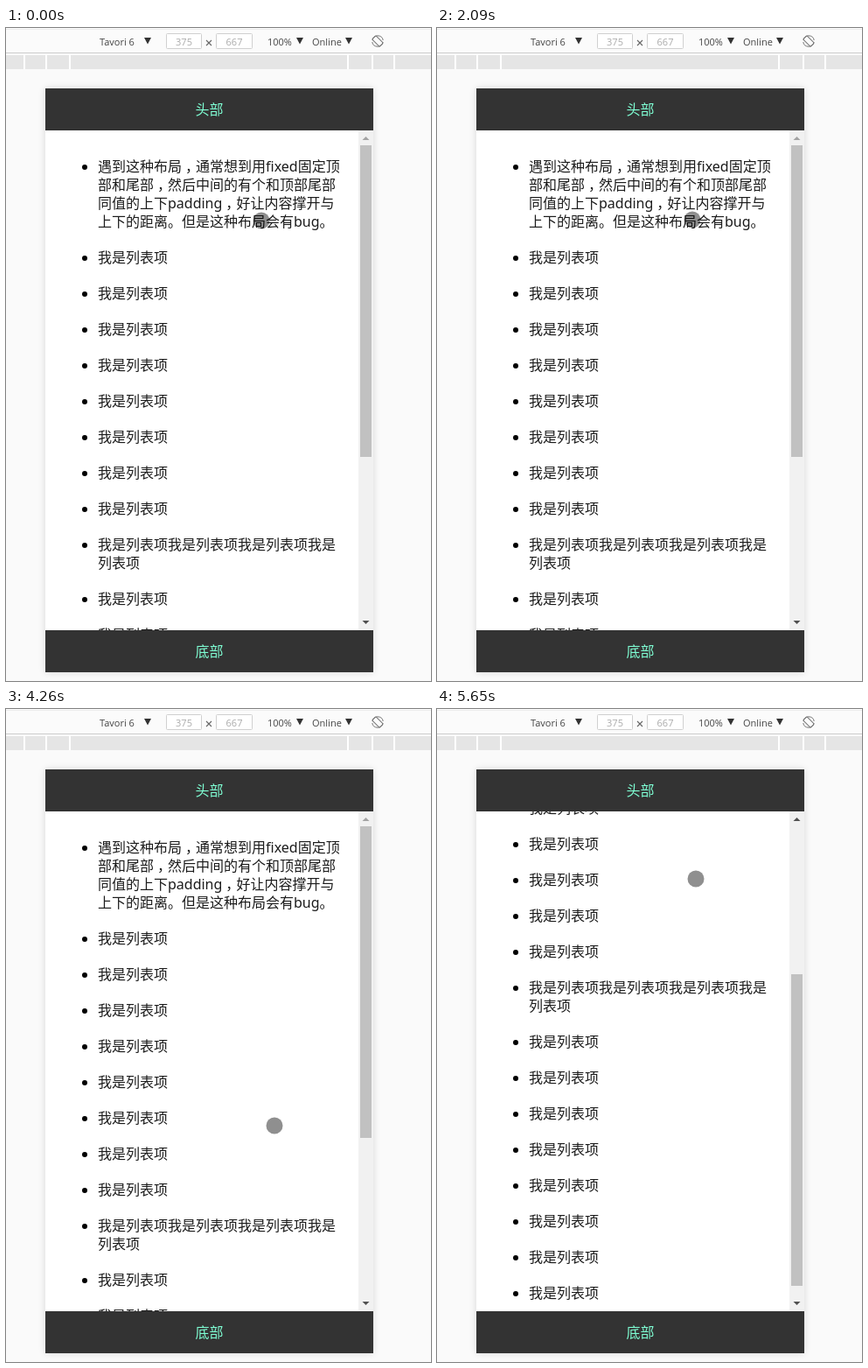
Recreate the animation shown at these times as an HTML page. Size 486 by 746 pixels, loop 5.96 s.

```html
<!DOCTYPE html>
<html lang="zh-CN">
<head>
<meta charset="utf-8">
<title>Fixed header and footer</title>
<style>
  html, body { margin: 0; width: 100%; height: 100%; overflow: hidden; background: #fafafa; }
  #stage { position: relative; width: 486px; height: 746px; overflow: hidden; background: #fafafa; }
  #stage > * { position: absolute; }
  #bar { left: 0; top: 0; font: 11px "Open Sans", sans-serif; }
  #phone {
    left: 45px; top: 69px; width: 375px; height: 667px; overflow: hidden; background: #fff;
    font: 16px/21px "Noto Sans", "Noto Sans CJK SC", "Noto Sans CJK", sans-serif; color: #1c1c1c;
  }
  #edge { left: 45px; top: 69px; width: 375px; height: 667px; box-shadow: 0 0 8px rgba(0, 0, 0, .14); }
  #phone > * { position: absolute; }
  header, footer {
    left: 0; width: 375px; height: 48px; line-height: 48px;
    background: #333; color: aquamarine; text-align: center;
  }
  header { top: 0; }
  footer { bottom: 0; }
  main { left: 0; top: 48px; width: 375px; height: 571px; overflow: hidden; }
  ul { position: absolute; left: 60px; top: 31px; margin: 0; padding: 0; list-style: none; white-space: nowrap; }
  li { position: relative; margin-bottom: 20px; }
  li::before {
    content: ""; position: absolute; left: -18px; top: 8px;
    width: 6px; height: 6px; border-radius: 50%; background: #000;
  }
  li div { height: 21px; }
  li i { position: relative; left: 4px; font-style: normal; }
  #track { position: absolute; right: 0; top: 0; }
  #touch {
    left: -9.5px; top: -9.5px; width: 19.5px; height: 19.5px;
    border-radius: 50%; background: rgba(0, 0, 0, .44);
  }
</style>
</head>
<body>
<div id="stage">
  <svg id="bar" width="486" height="48" fill="#444">
    <rect width="486" height="28" fill="#fbfbfb"/>
    <path d="M0 1.5H486" stroke="#ececec"/>
    <path d="M0 28.5H486" stroke="#ccc"/>
    <rect y="31" width="486" height="16" fill="#e5e5e5"/>
    <path d="M21 31v16M46 31v16M73 31v16M391 31v16M419 31v16M444 31v16" stroke="#fff" stroke-width="2"/>
    <text x="107" y="20">Tavori 6</text>
    <text x="299" y="20">100%</text>
    <text x="350" y="20">Online</text>
    <path d="M158 11h8l-4 7.5zM332 11h8l-4 7.5zM388 11h8l-4 7.5z" fill="#333"/>
    <g fill="#fff" stroke="#d0d0d0">
      <rect x="183.5" y="6.5" width="40" height="17" rx="1"/>
      <rect x="240.5" y="6.5" width="41" height="17" rx="1"/>
    </g>
    <g fill="#aaa" text-anchor="middle">
      <text x="203.5" y="20">375</text>
      <text x="261" y="20">667</text>
    </g>
    <path d="M229 14l6 6m0-6l-6 6" stroke="#666" stroke-width="1.1"/>
    <g transform="translate(425 15)" fill="none" stroke="#777">
      <rect x="-6" y="-3" width="12" height="6" rx="1" transform="rotate(45)"/>
      <path d="M-6 -1A6 6 0 0 1 0 -6.2Q5.5 -6 6.2 -1M6 1A6 6 0 0 1 0 6.2Q-5.5 6 -6.2 1"/>
    </g>
  </svg>

  <div id="edge"></div>
  <div id="phone">
    <main>
      <ul id="list"></ul>
      <svg id="track" width="17" height="571">
        <rect width="17" height="571" fill="#f1f1f1"/>
        <rect id="thumb" x="2" y="17" width="13" height="356" fill="#c1c1c1"/>
        <path id="up" d="M4.5 11h8l-4 -4z"/>
        <path id="down" d="M4.5 560h8l-4 4z"/>
      </svg>
    </main>
    <header>头部</header>
    <footer>底部</footer>
  </div>
  <div id="touch"></div>
</div>

<script>
const $ = id => document.getElementById(id);
const LOOP = 5960, MAX = 291;

const intro = ['遇到这种布局，通常想到用fixed固定顶', '部和尾部，然后中间的有个和顶部尾部',
  '同值的上下padding，好让内容撑开与', '上下的距离。但是这种布局会有bug。'];
const item = '我是列表项';
const short = Array(8).fill([item]);
const items = [intro, ...short, [item.repeat(3) + '我是', '列表项'], ...short];
const line = s => `<div>${s.replace('，', '<i>，</i>')}</div>`;
$('list').innerHTML = items.map(lines => `<li>${lines.map(line).join('')}</li>`).join('');

// Wheel scrolling with a resting pointer: scroll offset per step
const wheelDown = [20, 80, 147, 238, 275, 288, MAX];
const wheelUp = [285, 190, 80, 15, 0];
const wheel = (x, offsets) => offsets.map(s => ({ x, y: 218.5, s }));

// Touch drag: the page follows the finger after a short slop
const drag = ys => ys.map(y => ({
  x: y > 296.5 ? 302.5 + (y - 296.5) * 4 / 179 : 295.5 + (y - 193.5) * 7 / 103,
  y,
  s: Math.max(0, Math.round((475.5 - y) * .99 - 7))
}));
const approach = [230, 290, 370, 440, 468].map(y => ({
  x: 290.5 + 16 * (y - 218.5) / 257, y, s: 0
}));

// Each run: first change, last change, states
const runs = [
  [0, 0, [{ x: 291.5, y: 219.5, s: 0 }]],
  [760, 760, [{ x: 292.5, y: 218.5, s: 0 }]],
  [910, 1370, wheel(291.5, wheelDown)],
  [1770, 2090, wheel(291.5, wheelUp)],
  [2390, 2840, wheel(290.5, wheelDown)],
  [3390, 3720, wheel(290.5, wheelUp)],
  [3860, 4410, [...approach, ...drag([475.5, 470, 455])]],
  [4490, 5040, drag([433, 408, 380, 352, 324, 296.5, 272, 254])],
  [5100, 5650, drag([240, 228, 218, 210, 204, 199, 195, 193.5])]
];

function stateAt(t) {
  const [start, end, states] = runs.findLast(r => r[0] <= t);
  const last = states.length - 1;
  const k = last ? Math.floor((t - start) / (end - start) * last + .17) : 0;
  return states[Math.min(k, last)];
}

function draw(now) {
  const { x, y, s } = stateAt(now % LOOP);
  $('list').style.transform = `translateY(${-s}px)`;
  $('thumb').setAttribute('y', 17 + Math.round(s * .62));
  $('up').setAttribute('fill', s > 0 ? '#505050' : '#a3a3a3');
  $('down').setAttribute('fill', s < MAX ? '#505050' : '#a3a3a3');
  $('touch').style.transform = `translate(${x}px, ${y}px)`;
}

const t0 = performance.now();
function tick() {
  draw(performance.now() - t0);
  requestAnimationFrame(tick);
}
tick();
</script>
</body>
</html>
```
